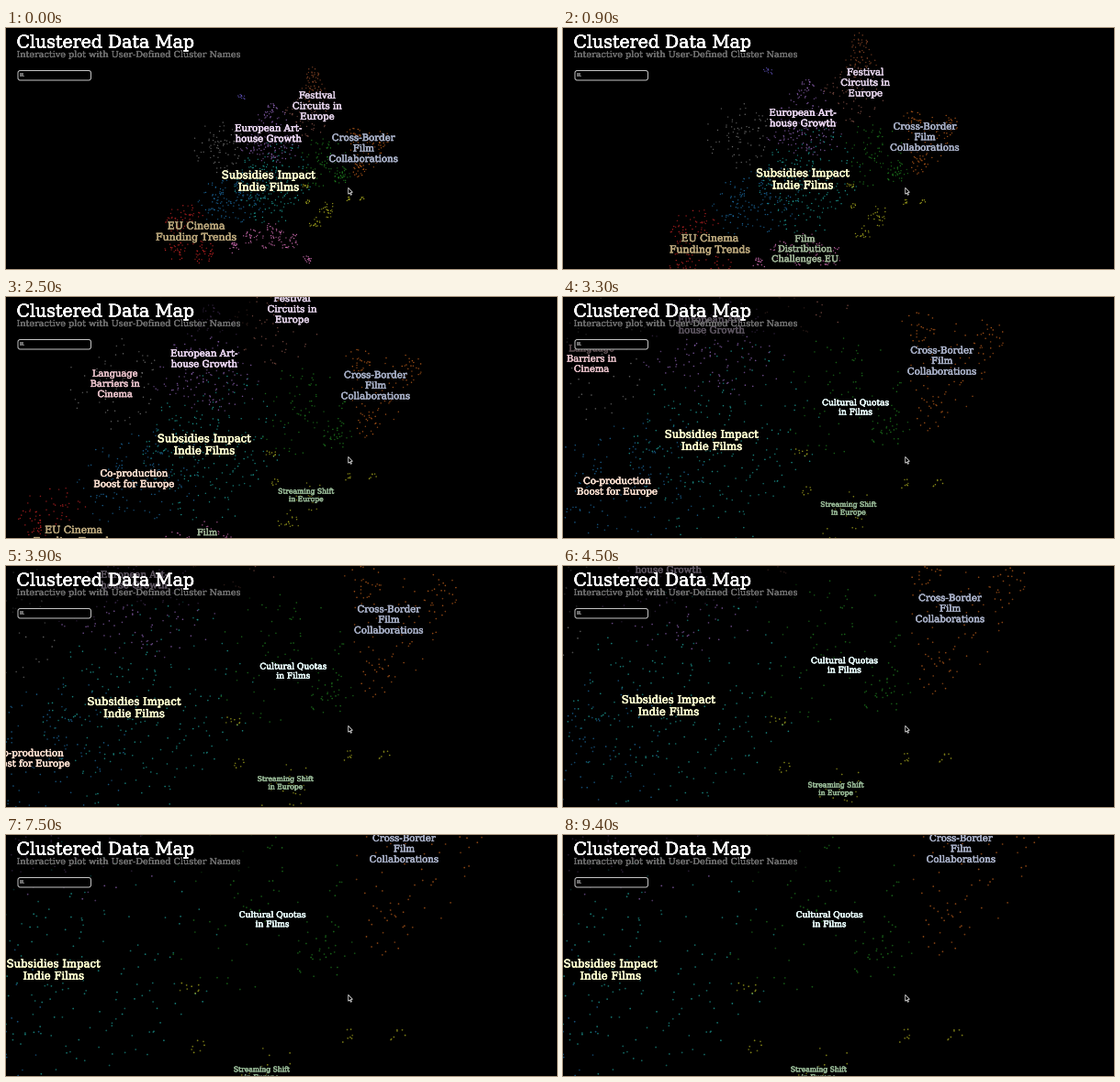
Animation of 600x263 px, one loop 9500 ms. Source, as a matplotlib script:

```python
import numpy as np
import matplotlib.pyplot as plt
from matplotlib.animation import FuncAnimation
from matplotlib.colors import to_rgb
from matplotlib.patches import FancyBboxPatch, Polygon, Rectangle
from matplotlib.patheffects import withStroke

W, H, DPI = 600, 263, 100
PX = 72 / DPI
FRAMES, STEP = 95, 100
ANCHOR = np.array([373, 174.4])

plt.rcParams.update({
    "font.family": "DejaVu Serif",
    "text.hinting": "none",
    "toolbar": "None",
})

# Key moments of the zoom: seconds, log of the scale
ZOOM_KEYS = [(0, 0), (1, 0.278), (1.8, 0.405), (2, 0.405),
             (3.3, 0.886), (4.5, 1.087), (5.6, 1.306)]

# Round blobs of dots per colour: x, y, radius
BLOBS = {
    "tab:gray": [(231, 130, 26)],
    "tab:red": [(181, 214, 7), (195, 209, 18), (186, 241, 12),
                (214, 244, 12)],
    "tab:blue": [(234, 190, 23), (258, 184, 26)],
    "lightseagreen": [(286, 178, 34), (296, 160, 36)],
    "slateblue": [(256, 75.5, 4)],
    "tab:purple": [(290, 87, 5), (290, 106, 18), (274, 125, 20),
                   (300, 130, 18)],
    "sienna": [(334, 52, 9), (336, 68, 13)],
    "tab:brown": [(330, 94, 24)],
    "forestgreen": [(365.5, 160.5, 9), (345, 148, 26)],
    "chocolate": [(386, 154.5, 8), (379, 115, 8), (410, 121, 8),
                  (392, 134, 18)],
    "tab:olive": [(387.5, 186.7, 2.5), (372, 186, 2.5), (328.5, 189.5, 2.5),
                  (326, 173, 3), (337, 213, 6), (350, 198, 8)],
    "tab:pink": [(266, 228, 8), (290, 228, 14), (308, 231, 11),
                 (247, 240, 6), (329, 252, 5)],
}

# text, x, y, size, colour; the first ones show from the start
LABELS = [
    ("Subsidies Impact\nIndie Films", 286, 167, 11.7, "#ffffcf"),
    ("EU Cinema\nFunding Trends", 207, 222, 10.9, "#b5a278"),
    ("European Art-\nhouse Growth", 286, 115, 10.2, "#e6d2ee"),
    ("Festival\nCircuits in\nEurope", 339, 85, 10.2, "#dccbe2"),
    ("Cross-Border\nFilm\nCollaborations", 389.4, 131.2, 10.2, "#a3abc2"),
    ("Film\nDistribution\nChallenges EU", 287.6, 226.2, 9.7, "#9bb093"),
    ("Language\nBarriers in\nCinema", 232, 130.2, 9.9, "#e2bcc4"),
    ("Co-production\nBoost for Europe", 243.6, 187.6, 10.2, "#f6dacb"),
    ("Streaming Shift\nin Europe", 347.4, 197.6, 7.6, "#90b08f"),
    ("Cultural Quotas\nin Films", 350.5, 152.1, 9.05, "#e6fafa"),
]
ALWAYS_SHOWN = 5


def make_dots():
    rng = np.random.default_rng(12)
    spots, colors = [], []
    for color, blobs in BLOBS.items():
        for x, y, radius in blobs:
            n = int(3 * radius)
            angle = rng.uniform(0, 2 * np.pi, n)
            r = 1.1 * radius * rng.uniform(0, 1, n) ** 0.6
            spots.append(np.column_stack([x + r * np.cos(angle),
                                          y + r * np.sin(angle)]))
            shade = rng.uniform(0.7, 1, (n, 1))
            colors.append(np.array(to_rgb(color)) * shade)
    return np.vstack(spots), np.vstack(colors)


def put_text(x, y, text, size, color, weight=0.0, edge=0.0, **kw):
    """Text thickened by `weight` pixels over a black edge."""
    strokes = [withStroke(linewidth=edge * PX, foreground="black"),
               withStroke(linewidth=weight * PX, foreground=color)]
    return ax.text(x, y, text, fontsize=size * PX, color=color,
                   va="baseline", path_effects=strokes, **kw)


def make_labels():
    lines = []
    for k, (text, x, y, size, color) in enumerate(LABELS):
        late = k - ALWAYS_SHOWN
        start = -1 if late < 0 else 0.12 + 0.14 * late
        rows = text.split("\n")
        for i, row in enumerate(rows):
            shift = (i - (len(rows) - 1) / 2) * 1.13 * size + 0.33 * size
            art = put_text(x, y, row, size, color, weight=0.5, edge=2,
                           ha="center", zorder=2)
            lines.append((art, np.array([x, y]), shift, start))
    return lines


fig = plt.figure(figsize=(W / DPI, H / DPI), dpi=DPI, facecolor="black")
ax = fig.add_axes([0, 0, 1, 1])
ax.set_xlim(0, W)
ax.set_ylim(H, 0)
ax.axis("off")

spots, colors = make_dots()
dots = ax.scatter(spots[:, 0], spots[:, 1], c=colors, linewidths=0, zorder=1)
lines = make_labels()

# Panels behind the title and the search box dim what passes beneath
for corner, width, height in [((0, 0), 268, 42), ((0, 42), 105, 20)]:
    ax.add_patch(Rectangle(corner, width, height, fc="black", alpha=0.62,
                           lw=0, zorder=3))
put_text(11.5, 21.5, "Clustered Data Map", 18.9, "white", weight=0.5,
         zorder=4)
put_text(11.5, 32, "Interactive plot with User-Defined Cluster Names", 9.65,
         "#6c6c6c", zorder=4)
ax.add_patch(FancyBboxPatch((13, 46.5), 79.5, 10.5,
                            boxstyle="round,pad=0,rounding_size=2.5",
                            fc="black", ec="#c4c4c4", lw=PX, zorder=4))
ax.add_patch(Rectangle((15, 49), 3.6, 3.8, fc="#6e6e6e", lw=0, zorder=5))
ax.add_patch(Rectangle((19.2, 52), 1, 1, fc="#6e6e6e", lw=0, zorder=5))

arrow = [(0, 0), (0, 7), (1.6, 5.6), (2.7, 8), (3.7, 7.5), (2.7, 5.2),
         (4.7, 5)]
ax.add_patch(Polygon(np.array(arrow) + (372.7, 174.3), fc="black",
                     ec="#e0e0e0", lw=0.8 * PX, zorder=6))


def draw(frame):
    zoom = np.interp(frame * STEP / 1000, *zip(*ZOOM_KEYS))
    scale = np.exp(zoom)
    dots.set_offsets(ANCHOR + (spots - ANCHOR) * scale)
    dots.set_sizes([((1.35 + 0.15 * (scale - 1)) * PX) ** 2])
    dots.set_alpha(0.9 - 0.15 * zoom)
    for art, home, shift, start in lines:
        x, y = ANCHOR + (home - ANCHOR) * scale
        art.set_position((x, y + shift))
        art.set_alpha(float(np.clip((zoom - start) / 0.04, 0, 1)))
        art.set_visible(bool(x > 0 and zoom > start and -30 < y < H + 30))
    return [dots]


anim = FuncAnimation(fig, draw, frames=FRAMES, interval=STEP, repeat=True,
                     repeat_delay=0, blit=False)
plt.show()
```
